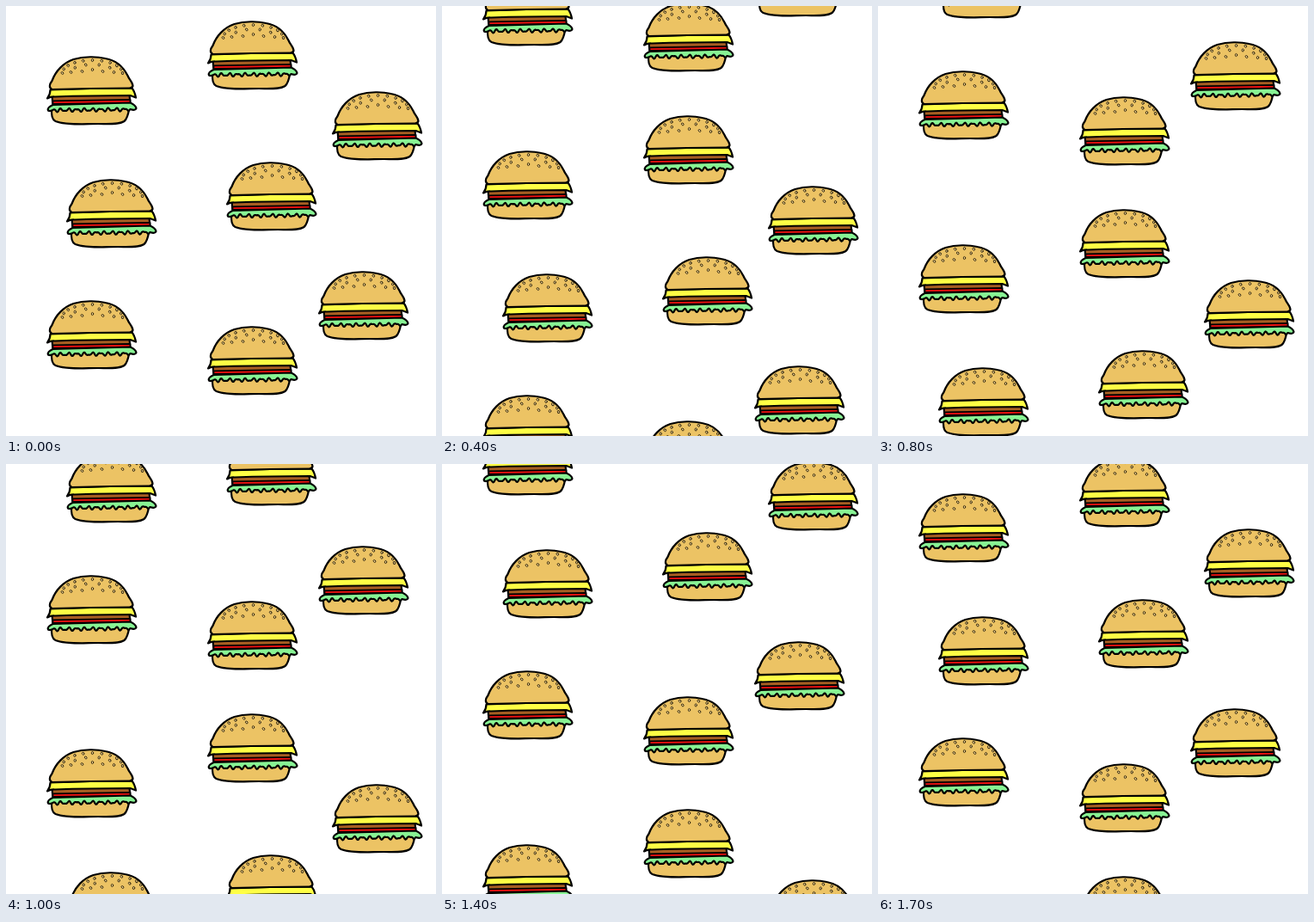
Animation, 500 px wide and 500 px high, one loop 1800 ms. Source, as an HTML page:

```html
<!DOCTYPE html>
<html lang="en">
<head>
<meta charset="utf-8">
<title>Falling burgers</title>
<style>
html, body { margin: 0; width: 100%; height: 100%; overflow: hidden; background: #fff; }
svg { display: block; width: 100vw; height: 100vh; }
</style>
</head>
<body>
<svg id="stage" viewBox="0 0 500 500">
  <defs>
    <g id="burger" stroke="#000" stroke-width="2.2" stroke-linejoin="round" stroke-linecap="round">
      <path fill="#ecc364" d="M6 60 C5 67 6 74 10 76 C24 81 44 79 60 79 C72 79 84 80 90 76 C94 73 95 66 96 60Z"/>
      <path fill="#a65e22" d="M6 46 L7 58 L97 56 L96 45Z"/>
      <path fill="#ee1111" stroke-width="1.8" d="M7 52.300 L97 50.800 L97 55 L7 56Z"/>
      <path id="lettuce" fill="#88f394"/>
      <path fill="#ffff45" d="M4 39.500 Q4 45 .5 49.500 Q5 47 9 47.500 Q50 46 97 46 L103.500 48.500 Q102 41 99 37.500 Q50 37.500 4 39.500Z"/>
      <path fill="#ecc364" d="M6 39 C2 37 3 33 6 29 C10 18 19 8 31 4 C43 .5 58 .5 68 3 C80 5 89 13 94 23 C96 28 100 31 100 35 Q99 37.500 96 37.500 Q50 37.500 6 39Z"/>
      <g id="seeds" fill="#f2d28a" stroke="#33280f" stroke-width=".9"></g>
    </g>
  </defs>
</svg>
<script>
const NS = "http://www.w3.org/2000/svg";
const PERIOD = 486, LOOP = 1800, STEP = 100;
const spots = [[48, 58], [235, 17], [380, 99], [71, 201], [257, 181], [48, 342], [235, 372], [364, 308]];
// Step number and distance fallen
const keys = [[0, 0], [6, 165], [10, 273], [12, 331], [14, 384], [17, 462], [18, PERIOD]];
const byId = id => document.getElementById(id);

function add(parent, tag, attrs) {
  const el = document.createElementNS(NS, tag);
  for (const k in attrs) el.setAttribute(k, attrs[k]);
  return parent.appendChild(el);
}

function seedArc(count, rx, ry, base) {
  for (let i = 0; i < count; i++) {
    const a = Math.PI * i / (count - 1);
    const x = 53 - rx * Math.cos(a), y = base - ry * Math.sin(a);
    add(byId("seeds"), "ellipse", {
      cx: x, cy: y, rx: 1.2, ry: 1.6, transform: `rotate(${i * 47 % 90 - 45} ${x} ${y})`
    });
  }
}

function lettucePath() {
  let d = "M7 57 L97 54.5 Q103 57 104 61 Q103 64 97 62";
  for (let x = 95; x > 7; x--) {
    const y = 63.3 - x * .01 + 1.5 * Math.sin(x * .68) + .8 * Math.sin(x * 1.13);
    d += `L${x} ${y.toFixed(1)}`;
  }
  return d + "Q4 65 1.5 63.5 Q0 60 7 57Z";
}

function fallen(step) {
  const i = keys.findIndex(k => k[0] > step);
  const [s0, d0] = keys[i - 1], [s1, d1] = keys[i];
  return Math.round(d0 + (d1 - d0) * (step - s0) / (s1 - s0));
}

seedArc(11, 35, 15, 20);
seedArc(6, 25, 9, 19);
seedArc(3, 12, 2, 18);
byId("lettuce").setAttribute("d", lettucePath());

const burgers = spots.flatMap(([x, y]) =>
  [0, -PERIOD].map(shift => ({ x: x - .5, y: y + shift, el: add(byId("stage"), "use", { href: "#burger" }) })));

function draw(ms) {
  const drop = fallen(Math.floor(ms % LOOP / STEP));
  for (const b of burgers) b.el.setAttribute("transform", `translate(${b.x} ${b.y + drop})`);
}

const start = performance.now();
function tick() {
  draw(performance.now() - start);
  requestAnimationFrame(tick);
}
tick();
</script>
</body>
</html>
```
